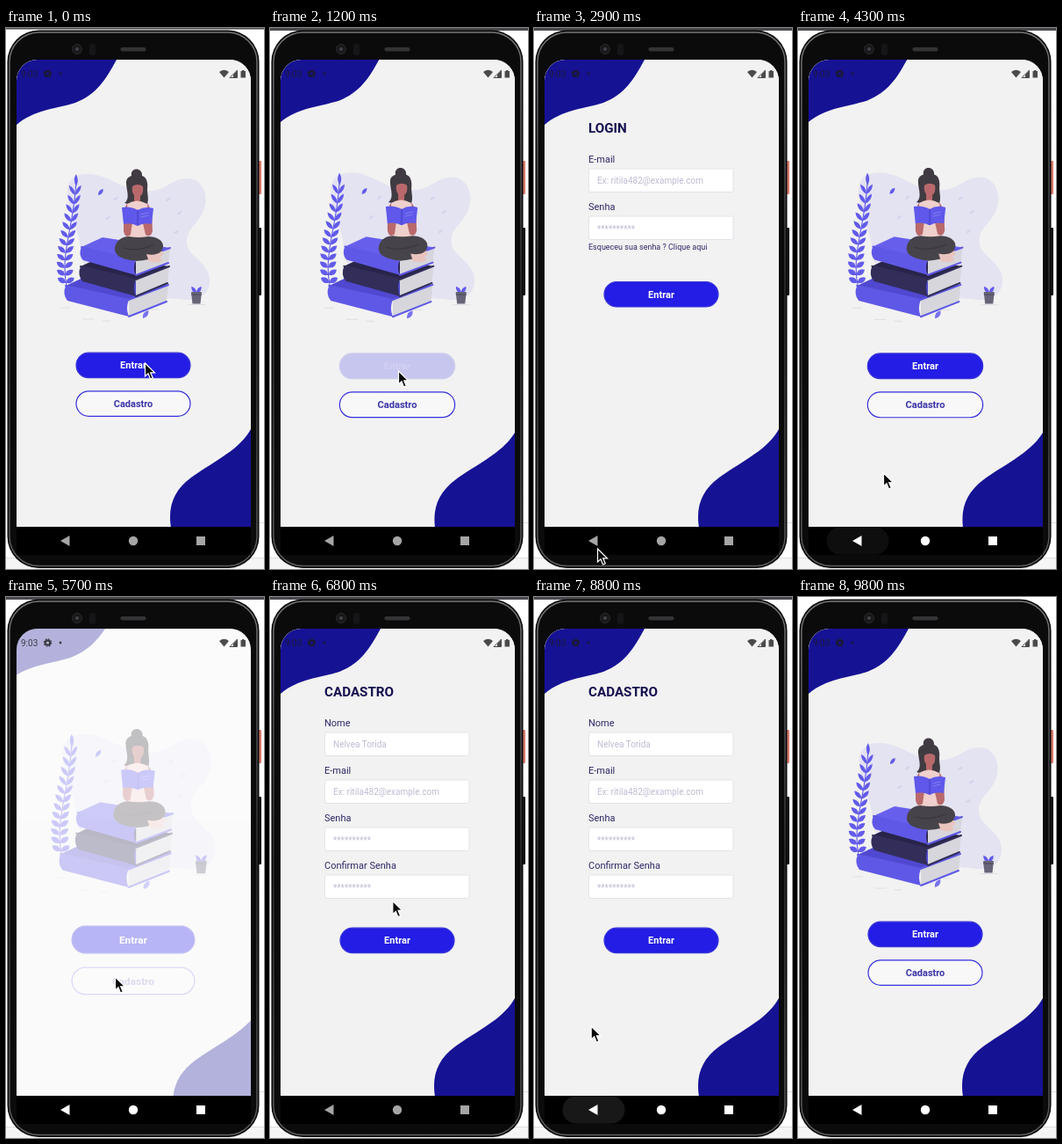
Write an HTML page that moves like this. It is 294 px wide and 615 px high and loops after 9900 ms.

```html
<!DOCTYPE html>
<html lang="pt">
<head>
<meta charset="utf-8">
<style>
html, body { margin: 0; width: 100%; height: 100%; overflow: hidden; background: #fff; }
svg { display: block; }
text { font-family: Roboto, sans-serif; }
.title { font-weight: 700; font-size: 15.2px; fill: #14104f; }
.label { font-size: 11px; fill: #2d2966; }
.hint { font-size: 10px; fill: #bdbcd3; }
.button { font-weight: 700; font-size: 11px; text-anchor: middle; }
</style>
</head>
<body>
<svg id="stage" width="294" height="615" viewBox="0 0 294 615"></svg>
<script>
const LOOP = 9900, SLIDE = 400;
const stage = document.getElementById('stage');
const clamp = v => Math.max(0, Math.min(1, v));

// ---------- drawing helpers ----------
const shape = (d, fill, extra = '') => `<path d="${d}" fill="${fill}" ${extra}/>`;
const line = (d, stroke, width = 1) => shape(d, 'none', `stroke="${stroke}" stroke-width="${width}" stroke-linecap="round"`);
const leaf = (x, y, angle, length, width, fill = '#625bea') =>
  shape(`M0 0Q${length / 2} ${-width} ${length} 0Q${length / 2} ${width} 0 0Z`, fill,
    `transform="translate(${x} ${y}) rotate(${angle})"`);
const text = (x, y, kind, value) => `<text x="${x}" y="${y}" class="${kind}">${value}</text>`;

const button = (y, label, solid = true, id = '') => `
  <g id="${id}">
    <rect x="80" y="${y}" width="130" height="28.5" rx="14.25" fill="${solid ? '#231de5' : '#f8f8f9'}"
      stroke="${solid ? '#3a35d8' : '#3530dc'}" stroke-width="1.2"/>
    <text x="145" y="${y + 18.2}" class="button" fill="${solid ? '#fff' : '#3a34a8'}">${label}</text>
  </g>`;

const field = (y, label, hint) => text(62, y, 'label', label) +
  `<rect x="62.5" y="${y + 7.5}" width="164.5" height="26.5" rx="1.5" fill="#fff" stroke="#e2e2ea"/>` +
  text(72, y + (hint[0] === '*' ? 25.5 : 24.5), 'hint', hint);

const page = (id, content) => `
  <g id="${id}">
    <rect x="12" y="36" width="267" height="532" fill="#f2f2f2"/>
    ${shape('M12 36H126C114 58 104 75 79 85C56 92 32 93 12 110Z', '#161294')}
    ${shape('M279 456C266 480 236 493 211 511C192 525 184 543 188 568H279Z', '#161294')}
    ${content}
  </g>`;

// ---------- illustration ----------
function plant() {
  const at = (s, a, b, c, d) => a * (1 - s) ** 3 + 3 * b * s * (1 - s) ** 2 + 3 * c * s * s * (1 - s) + d * s ** 3;
  let out = line('M69 293C61 255 79 222 80 170', '#625bea', 1.1) + leaf(80, 180, -91, 14, 4);
  for (let i = 0; i < 12; i++) {
    const s = 0.03 + i * 0.076, x = at(s, 69, 61, 79, 80), y = at(s, 293, 255, 222, 170);
    const spread = 58 - i * 2.6, length = 11 + i * 0.2, width = 6 - i * 0.18;
    out += leaf(x, y, -92 - spread, length, width) + leaf(x, y, -88 + spread, length, width);
  }
  return out;
}

// Left end, front corner and right end of the upper cover edge.
function book([lx, ly], [cx, cy], [rx, ry], thick, cover, top) {
  const edge = `L${cx} ${cy}L${rx} ${ry}`;
  return shape(`M${lx} ${ly}L${lx + 24} ${ly - 11}L${rx} ${ry}L${cx} ${cy}Z`, top) +
    shape(`M${cx} ${cy}L${rx} ${ry}L${rx - 2} ${ry + thick}L${cx} ${cy + thick}Z`, '#d6d6dc') +
    shape(`M${lx} ${ly}L${cx} ${cy}Q${cx - 4} ${cy + thick / 2} ${cx} ${cy + thick}L${lx + 2} ${ly + thick - 2}Q${lx - 4} ${ly + thick / 2} ${lx} ${ly}Z`, cover) +
    line(`M${lx} ${ly}${edge}M${cx} ${cy + thick}L${rx - 2} ${ry + thick}`, cover, 2);
}

const books = () =>
  book([68, 293], [140, 309], [185, 292], 19, '#5f58e6', '#5048d0') +
  book([85, 271], [148, 286], [186, 271], 19, '#322e59', '#28244a') +
  book([86, 249], [148, 264], [187, 250], 17, '#5f58e6', '#675fec');

const reader = () =>
  shape('M135 199C142 194 137 184 137 176C137 171 140 169 143 168C141 158 156 158 155 168C160 169 162 176 161 183C161 190 163 194 161 200L150 203Z', '#403b42') +
  shape('M144 180Q150 176 156 180C157 186 155 190 153 191V199H146V190Q143 186 144 180Z', '#b9696b') +
  shape('M138 200Q149 193 161 200L164 222L160 242H139L135 222Z', '#efd0cc') +
  shape('M138 199L134 208V231Q136 240 142 235L144 221L139 220ZM161 199L166 208L167 231Q165 239 159 235L156 222L162 220Z', '#b9696b') +
  shape('M132 204Q142 202 150 207Q158 202 168 205L166 223Q157 221 150 225Q142 221 134 223Z', '#5f58ea') +
  line('M150 207V224', '#3e38ba', 0.8) + line('M154 212L162 210M154 215L162 213', '#8d88f2', 0.8) +
  shape('M160 256Q168 251 178 254Q181 259 175 260L178 264Q172 269 160 264Z', '#e9c4bf') +
  shape('M124 250C125 241 133 237 140 237Q151 239 162 237C172 237 180 242 179 249C178 257 168 259 160 257L162 263Q148 267 134 262Q123 258 124 250Z', '#47434a') +
  line('M134 250Q148 255 168 247', '#333037', 0.8);

const illustration = () =>
  shape('M70 185C70 165 92 162 113 170C140 182 145 188 168 185C185 182 190 171 207 171C224 171 231 190 226 205C221 222 206 226 206 243C206 260 230 265 232 285C233 300 224 309 205 309L110 300L85 262C88 235 70 215 70 185Z', '#e4e3f1') +
  line('M63 318H73M88 331H100M110 333H118M165 320H174M208 314.5H227', '#d9d9e2', 0.8) +
  plant() + books() + reader() +
  leaf(105, 190, -50, 9, 4) + leaf(156, 330, -55, 11, 5, '#7771ee') +
  [[113, 218], [182, 197], [195, 212], [191, 234], [122, 196]].map(([x, y]) => leaf(x, y, -35, 7, 3, '#d6d4ec')).join('') +
  leaf(217, 302, -125, 10, 4) + leaf(217, 302, -55, 10, 4) +
  shape('M211 300H223L221.5 313.5H212.5Z', '#676378') + line('M211.500 303H222.500', '#4b475a', 1);

// ---------- phone ----------
const statusBar = `
  <g fill="#1c1c1c" opacity=".78">
    <text x="17" y="56" font-size="10">9:03</text>
    <circle cx="47.5" cy="52" r="2.7" fill="none" stroke="#1c1c1c" stroke-width="2.2"/>
    <circle cx="47.5" cy="52" r="4.2" fill="none" stroke="#1c1c1c" stroke-width="1.2" stroke-dasharray="1.7 1.6"/>
    <circle cx="62" cy="52" r="1.4"/>
    <path d="M243 50Q248.500 45.500 254 50L248.500 56.500Z"/>
    <path d="M255 56.500L263.500 48V56.500Z" fill="none" stroke="#1c1c1c"/>
    <path d="M259 56.500V53L263 49V56.500Z"/>
    <path d="M267.500 49H269V48H271.500V49H273V56.500H267.500Z"/>
  </g>`;

const email = 'Ex: ritila482@example.com', stars = '**********';

stage.innerHTML = `
  <defs>
    <clipPath id="screen"><path d="M12 567V60A24 24 0 0 1 36 36H255A24 24 0 0 1 279 60V567Z"/></clipPath>
    <linearGradient id="rim" x2="0" y2="1">
      <stop offset="0" stop-color="#77777a"/><stop offset=".5" stop-color="#2c2c2e"/><stop offset="1" stop-color="#5c5c5f"/>
    </linearGradient>
  </defs>
  <rect width="294" height="615" fill="#fff"/>
  <path d="M0 602.500H294M286 562.500H294" stroke="#dedee0"/>
  <rect y="603" width="294" height="12" fill="#f5f5f6"/>
  <rect id="edge" width="294" fill="#48484c"/>
  <rect x="286" y="151" width="5" height="38" rx="1" fill="#d9796c"/>
  <rect x="286" y="227" width="5" height="77" rx="1" fill="#151517"/>
  <rect x="1.500" y="2.500" width="287" height="611.500" rx="36" fill="#0a0a0b"/>
  <rect x="4" y="5" width="282" height="606.500" rx="33.500" fill="#0b0b0c" stroke="url(#rim)" stroke-width="1.500"/>
  <circle cx="81" cy="24" r="5.500" fill="#18181a" stroke="#2a2a2d"/>
  <circle cx="81" cy="24" r="2" fill="#434348"/>
  <rect x="95" y="18" width="7" height="13" rx="3" fill="#161618"/>
  <rect x="130.500" y="22" width="29" height="4.500" rx="2.200" fill="#343437"/>
  <g clip-path="url(#screen)">
    <rect x="12" y="36" width="267" height="532" fill="#fff"/>
    ${page('home', illustration() + button(369.2, 'Entrar', true, 'enter') + button(412.8, 'Cadastro', false, 'join'))}
    ${page('login', text(62, 118.5, 'title', 'LOGIN') + field(152.5, 'E-mail', email) + field(206.5, 'Senha', stars) +
      `<text x="62" y="251.500" font-size="9" fill="#2d2966">Esqueceu sua senha ? Clique aqui</text>` + button(288.5, 'Entrar'))}
    ${page('signup', text(62, 112.5, 'title', 'CADASTRO') + field(146.5, 'Nome', 'Nelvea Torida') + field(200.5, 'E-mail', email) +
      field(254.5, 'Senha', stars) + field(308.5, 'Confirmar Senha', stars) + button(376.2, 'Entrar'))}
    ${statusBar}
  </g>
  <rect x="12" y="567" width="267" height="32" fill="#000"/>
  <rect id="ripple" y="567.500" height="31" rx="15.500" fill="#fff"/>
  <g id="nav"><path d="M62 583L72.500 577V589Z"/><circle cx="145" cy="583" r="5.200"/><rect x="217" y="578" width="10" height="10"/></g>
  <path id="cursor" d="M.5 0V15L4 11.800L6.500 18L9.300 16.800L6.700 10.800H11.500Z" fill="#0a0a0a" stroke="#fff" stroke-width="1.200"/>`;

const part = Object.fromEntries([...stage.querySelectorAll('[id]')].filter(e => e.id).map(e => [e.id, e]));
const assign = (element, attributes) => Object.entries(attributes).forEach(([key, value]) => element.setAttribute(key, value));
const set = (name, attributes) => assign(part[name], attributes);

// ---------- motion ----------
// cubic-bezier(.35, .45, 0, 1)
function ease(x) {
  if (x <= 0 || x >= 1) return clamp(x);
  let low = 0, high = 1, u;
  for (let i = 0; i < 24; i++) {
    u = (low + high) / 2;
    if (1.05 * u * (1 - u) ** 2 + u ** 3 < x) low = u; else high = u;
  }
  return 1.35 * u * (1 - u) ** 2 + 3 * u * u * (1 - u) + u ** 3;
}

const openness = (t, open, close) => ease((t - open) / SLIDE) - ease((t - close) / SLIDE);

// time, x, y of the pointer tip
const pointer = [
  [0, 158, 381], [200, 158, 381], [400, 146, 390], [1700, 146, 390], [1900, 147, 385], [2000, 147, 385],
  [2100, 138, 402], [2400, 67, 509], [2600, 67, 509], [2800, 78, 560], [2900, 72, 592], [3100, 62, 590],
  [3200, 62, 590], [3300, 61, 589], [4000, 61, 589], [4300, 97, 506], [4600, 124, 432], [6400, 124, 432],
  [6700, 140, 350], [7000, 138, 337], [7400, 82, 473], [8100, 61, 582], [8700, 61, 582], [9000, 72, 300],
  [9300, 53, -8], [9400, 53, -40], [LOOP, 53, -40]
];

function pointerAt(t) {
  const i = pointer.findIndex(p => p[0] > t);
  const [t0, x0, y0] = pointer[i - 1], [t1, x1, y1] = pointer[i];
  const k = (t - t0) / (t1 - t0);
  return [x0 + (x1 - x0) * k, y0 + (y1 - y0) * k];
}

const zoom = (name, scale, opacity) => set(name, {
  transform: `translate(145.5 302) scale(${scale}) translate(-145.5 -302)`, opacity
});

// A pressed button fades its face and its caption separately.
function fadeButton(name, t, press, release) {
  const opacity = 1 - 0.8 * clamp((t - press) / 100) + 0.8 * clamp((t - release) / 250);
  for (const child of part[name].children) assign(child, { opacity });
}

function draw(t) {
  const login = openness(t, 1173, 4120), signup = openness(t, 5582, 8820);
  const covered = Math.max(login, signup);
  zoom('home', 1 + 0.1 * covered, clamp((1 - covered) / 0.7925));
  for (const [name, p] of [['login', login], ['signup', signup]]) zoom(name, 0.85 + 0.15 * p, clamp((p - 0.75) / 0.125));

  fadeButton('enter', t, 850, 1200);
  fadeButton('join', t, 5200, 5600);

  const sinceBack = t - (t < 8400 ? 3700 : 8400);
  const half = 18.5 + 17 * clamp(sinceBack / 400);
  set('ripple', {
    x: 68 - half, width: half * 2,
    opacity: sinceBack < 0 ? 0 : 0.18 * clamp(1 - sinceBack / 850)
  });

  const awake = t >= 8500 || (t >= 3700 && t < 6300) ? 1 : t >= 6300 ? clamp((6600 - t) / 300) : 0;
  const shade = 165 + 90 * awake;
  set('nav', { fill: `rgb(${shade},${shade},${shade})` });

  set('edge', { height: t < 900 ? 1.5 : t < 9800 ? 3 : 0 });
  set('cursor', { transform: `translate(${pointerAt(t)})` });
}

function tick() {
  draw(Math.floor(performance.now() % LOOP / 100) * 100);
  requestAnimationFrame(tick);
}
tick();
</script>
</body>
</html>
```
